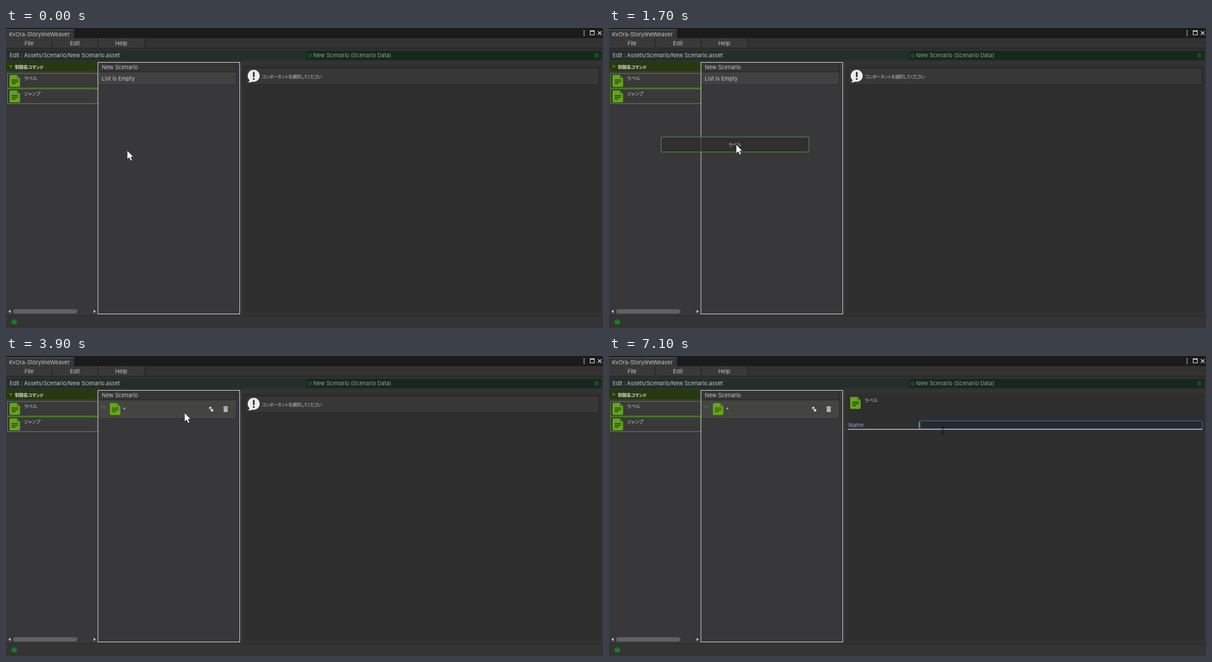
An HTML page that plays this animation: 1000x502 px, repeating every 7.2 s.

```html
<!DOCTYPE html>
<html lang="ja">
<head>
<meta charset="utf-8">
<title>Scenario editor</title>
<style>
  html, body { margin: 0; width: 100%; height: 100%; overflow: hidden; background: #1b1b1c; }
  svg { display: block; width: 100%; height: 100%; }
  text { font: 9.2px Inter, "Noto Sans CJK JP", sans-serif; fill: #c6c6c6; white-space: pre; }
  .jp { font-family: "Noto Sans CJK JP", "Noto Sans CJK", sans-serif; font-size: 7.9px; font-feature-settings: "palt"; }
</style>
</head>
<body>
<svg id="stage" viewBox="0 0 1000 502"></svg>
<script>
const LOOP = 7200, STEP = 100;
const GREEN = '#66a51c';
const stage = document.getElementById('stage');

const box = (x, y, w, h, fill, stroke = 'none', extra = '') =>
  `<rect x="${x}" y="${y}" width="${w}" height="${h}" fill="${fill}" stroke="${stroke}" ${extra}/>`;
const label = (x, y, str, extra = '') => `<text x="${x}" y="${y}" ${extra}>${str}</text>`;
const kana = (x, y, str, extra = '') => label(x, y, str, `class="jp" ${extra}`);
const path = (d, fill, extra = '') => `<path d="${d}" fill="${fill}" ${extra}/>`;
const line = (d, stroke, width = 1) => path(d, 'none', `stroke="${stroke}" stroke-width="${width}"`);
const group = (id, body, extra = '') => `<g id="${id}" ${extra}>${body}</g>`;

// Document icon with a folded corner
const sheet = (x, y) => `<g transform="translate(${x} ${y})">` +
  path('M1.5 0H12L17.5 5.5V18.5Q17.5 20 16 20H1.5Q0 20 0 18.5V1.5Q0 0 1.5 0Z', GREEN) +
  path('M12 0V5.5H17.5Z', '#4c8115') +
  line('M3.5 8.5H14.5M3.5 11.5H14.5M3.5 14.5H10', '#263a12', 1.3) + '</g>';

const item = (id, y, name) =>
  box(2.5, y, 151.5, 24.5, '#39393a', '#568f1d', `id="${id}"`) +
  sheet(6, y + 2.5) + kana(30, y + 11, name);

const chrome = () =>
  box(0, 0, 1000, 502, '#38373a') +
  box(0, 0, 1000, 17, '#1b1b1c') +
  box(0, 2, 114, 15, '#363637') + box(0, 2, 114, 1.2, '#365a94') +
  label(5, 13.6, 'KvOra-StorylineWeaver') +
  `<g fill="#d8d8d8">${[5, 8.5, 12].map(y => `<circle cx="968.3" cy="${y}" r="1"/>`).join('')}</g>` +
  box(978.5, 4.5, 7, 7, 'none', '#d8d8d8') + box(978, 4, 8, 2, '#d8d8d8') +
  line('M991.5 5.5L997.5 11.5M997.5 5.5L991.5 11.5', '#d8d8d8', 1.2) +
  box(0, 17, 1000, 16, '#323233') + box(0, 17, 231, 16, '#39393a') +
  line('M77.5 17V33M154.5 17V33M231.5 17V33M0 33.5H1000', '#222223') +
  [[38.5, 'File'], [115.5, 'Edit'], [193, 'Help']]
    .map(([x, s]) => label(x, 28.6, s, 'text-anchor="middle"')).join('') +
  box(0, 34, 1000, 23, '#2f3031') +
  box(2, 38, 995, 16, '#232f2a', 'none', 'rx="2"') +
  label(6, 49.3, 'Edit : Assets/Scenario/New Scenario.asset') +
  box(503, 38.5, 494, 14.5, '#15291a', 'none', 'rx="2"') +
  line('M506 44L508.5 42.5L511.5 44V47.5L508.5 49.3L506 47.5ZM506 44L508.7 46L511.5 44M508.7 46V49', '#2b6d31', .8) +
  label(514.5, 49.3, 'New Scenario (Scenario Data)', 'style="fill:#93a096"') +
  `<circle cx="989" cy="45.7" r="3.2" fill="none" stroke="#187a20"/><circle cx="989" cy="45.7" r="1.2" fill="#187a20"/>`;

const palette = () =>
  box(0, 57, 153, 15, '#27390f') + path('M4.8 62.5H11.2L8 67.8Z', '#47761c') +
  kana(15, 67.6, '制御系コマンド', 'style="font-size:7.2px;font-weight:700;fill:#dedede"') +
  item('labelItem', 76, 'ラベル') + item('jumpItem', 102, 'ジャンプ') +
  box(12, 470.5, 107.5, 7.5, '#606061', 'none', 'rx="3.7"') +
  path('M4 474.3L7.6 471.5V477ZM150.4 474.3L146.8 471.5V477Z', '#cfcfcf');

const list = () =>
  box(154, 57, 238, 421, '#38373a') +
  box(155, 59, 230.5, 14, '#353536') + line('M155 73.5H385.5V59', '#232324') +
  label(160.5, 69.2, 'New Scenario') +
  group('empty', box(155, 74, 230.5, 21, '#414142') +
    line('M155 95.2H385.5V74', '#2a2a2b') + label(160.5, 88.2, 'List is Empty')) +
  group('row',
    group('rowIdle', box(155, 74, 230.5, 30.5, '#444540') + line('M155 104.5H385.5V74', '#303030') +
      line('M159 83.5H167M159 86.5H167', '#5c5d55')) +
    group('rowPicked', box(154.5, 75.9, 230, 26.2, '#4e6536', '#bfc8b5')) +
    sheet(174, 78.7) + label(196, 93, '*') +
    path('M340.5 85H344V89H340.5Z', '#d6d6d6') + path('M342.5 88.2H347.5V93.2H342.5Z', '#d6d6d6', 'stroke="#333" stroke-width=".7"') +
    line('M364 85.7H372M366.5 84.7H369.5', '#dedede', 1.3) +
    path('M364.8 87.2H371.2V92.3Q371.2 93.5 370 93.5H366Q364.8 93.5 364.8 92.3Z', '#dedede') +
    line('M366.8 88.2V92.4M369.2 88.2V92.4', '#444', .8)) +
  box(154, 57.5, 237.5, 421, 'none', '#cfd1cc');

const inspector = () =>
  box(392, 57, 608, 424, '#343435') +
  box(396, 61, 602, 417, '#313131', 'none', 'rx="3"') + box(399, 64, 597, 411, '#2e2e2e') +
  group('notice', box(401, 67, 592.5, 28, '#373738', '#252526', 'rx="2"') +
    path('M415 70A10 10 0 1 1 412.5 89.7Q409 91.5 405.5 91Q408 89.5 408 87.2A10 10 0 0 1 415 70Z', '#ededed') +
    line('M415 73.5V82', '#2c2c2c', 2.8) + `<circle cx="415" cy="85.2" r="1.6" fill="#2c2c2c"/>` +
    kana(428.5, 83.8, 'コンポーネントを選択してください', 'style="font-size:7.3px;letter-spacing:-.35px"')) +
  group('details', sheet(404, 68.5) + kana(428, 76.6, 'ラベル') +
    label(401, 118.6, 'Name', 'id="nameLabel"') +
    box(518.5, 108.5, 475, 13.5, '#292929', '#1f1f1f', 'id="field" rx="2"') +
    line('M400 122.6H994', '#d2d2d2', 1.3) +
    box(520, 110, 1, 11, '#c8c8c8', 'none', 'id="caret"'));

const footer = () =>
  box(0, 481, 1000, 21, '#343435') + line('M0 481.5H1000', '#29292a') +
  `<circle cx="13.8" cy="491.8" r="4.2" fill="#129018"/>` +
  label(13.8, 494.4, '?', 'text-anchor="middle" style="font-size:7px;font-weight:700;fill:#14391a"') +
  kana(26, 494.6, 'ジャンプ先のラベルを設定します。', 'id="hint" style="font-size:8.6px;letter-spacing:-.15px"');

const overlay = () =>
  `<defs><clipPath id="inside">${box(0, 0, 392, 502, '#000')}</clipPath>
   <clipPath id="outside">${box(392, 0, 608, 502, '#000')}</clipPath></defs>` +
  `<g clip-path="url(#inside)">${group('ghost',
    box(-125.5, -12.5, 247.5, 25, '#2b2c27', '#58911d', 'fill-opacity=".68"') +
    kana(-2, 3, 'ラベル', 'text-anchor="middle"'))}</g>` +
  `<g clip-path="url(#outside)" opacity=".45"><use href="#ghost"/></g>` +
  group('arrow', path('M0 0V15L3.4 11.8L5.8 17.3L8.4 16.1L6.1 10.8H10.5Z', '#fff', 'stroke="#222" stroke-width=".7"')) +
  group('hand', path('M11 22L7 16Q6.5 14.3 8 14.2L10.2 16V9Q11 7.6 12.3 9V13L12.7 7.7Q13.8 6.3 14.8 7.7V13L15.5 8.3Q16.7 7.2 17.5 8.6V13.5L18.4 10.5Q19.7 9.5 20.4 11V17Q20.3 20 18.5 22V24H11.5Z',
    '#fff', 'stroke="#222" stroke-width=".7"')) +
  group('beam', line('M-2.5 -6H2.5M-2.5 6H2.5M0 -6V6', '#0c0c0c', 1));

stage.innerHTML = chrome() + palette() + list() + inspector() + footer() + overlay();

const ui = {};
stage.querySelectorAll('[id]').forEach(el => ui[el.id] = el);
const show = (el, on) => el.style.display = on ? '' : 'none';
const moveTo = (el, p) => el.setAttribute('transform', `translate(${p.x} ${p.y})`);

// Pointer track: time, x, y
const track = [
  [0, 203, 205], [800, 97, 91], [1000, 98, 92], [1700, 213, 195], [2400, 283, 187],
  [2800, 283, 187], [3600, 299, 120], [3900, 299, 95], [4400, 299, 95],
  [4800, 502, 112], [5200, 559, 125], [LOOP, 559, 125]
];

function pointer(t) {
  const i = track.findIndex(k => k[0] > t);
  const [t0, x0, y0] = track[i - 1], [t1, x1, y1] = track[i];
  const u = (t - t0) / (t1 - t0), e = (u + u * u * (3 - 2 * u)) / 2;
  return { x: x0 + (x1 - x0) * e, y: y0 + (y1 - y0) * e };
}

function render(t) {
  const p = pointer(t);
  const overItems = p.x < 154 && p.y > 76 && p.y < 127;
  const overLabel = overItems && p.y < 101;
  const dropped = t >= 2600, opened = t >= 4200, focused = t >= 5300;
  const typing = opened && p.x > 518;

  show(ui.hint, overLabel);
  ui.labelItem.setAttribute('stroke', overLabel ? '#515152' : '#568f1d');

  show(ui.ghost, t >= 900 && !dropped);
  moveTo(ui.ghost, p);

  show(ui.empty, !dropped);
  show(ui.row, dropped);
  show(ui.rowPicked, opened && !focused);
  show(ui.rowIdle, !opened || focused);

  show(ui.notice, !opened);
  show(ui.details, opened);
  ui.nameLabel.style.fill = focused ? '#7fabe8' : '#c6c6c6';
  ui.field.setAttribute('stroke', focused ? '#3a72b0' : '#1f1f1f');
  show(ui.caret, focused && !(t >= 5900 && t < 6100) && !(t >= 6600 && t < 7100));

  show(ui.hand, overItems);
  show(ui.beam, typing);
  show(ui.arrow, !overItems && !typing);
  [ui.hand, ui.beam, ui.arrow].forEach(el => moveTo(el, p));
}

const start = performance.now();
function tick() {
  const t = (performance.now() - start) % LOOP;
  render(Math.floor(t / STEP) * STEP);
  requestAnimationFrame(tick);
}
tick();
</script>
</body>
</html>
```
